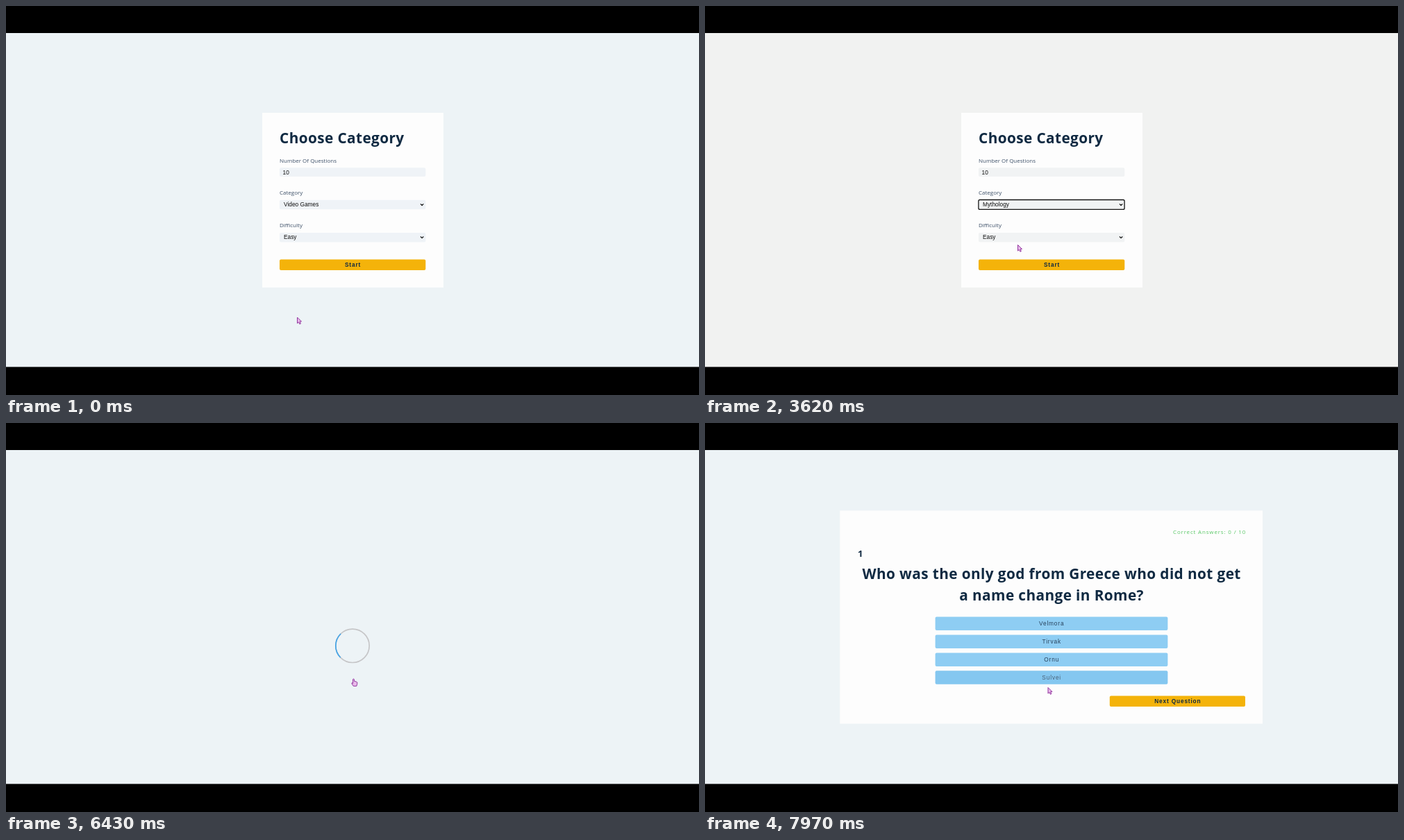
Write an HTML page with a canvas that moves like this. It is 998 px wide and 561 px high and loops after 8000 ms.

```html
<!DOCTYPE html>
<html lang="en">
<head>
<meta charset="utf-8">
<title>Quiz</title>
<style>
  html, body { margin: 0; width: 100%; height: 100%; overflow: hidden; background: #000; }
  canvas { display: block; width: 100vw; height: 100vh; }
</style>
</head>
<body>
<canvas id="stage" width="998" height="561"></canvas>
<script>
const ctx = document.getElementById('stage').getContext('2d');

const LOOP = 8000;
const FOCUS = 2650, PICK = 3250, LOAD = 4780, QUIZ = 6850, LEAVE = 7720;
const SPIN = 600, FADE = 300;

const SANS = '"Open Sans", "Noto Sans", sans-serif';
const ARIAL = '"Liberation Sans", Arial, sans-serif';
const INK = '#102a42', LABEL = '#3d5068', AMBER = '#f4b30a', CARD = '#fdfdfd';
const SKY = [142, 205, 243], DEEP = [79, 169, 224];
const DARK = [40, 66, 92], WHITE = [255, 255, 255];

const ANSWERS = ['Velmora', 'Tirvak', 'Ornu', 'Sulvei'];

// time, x, y of the pointer tip
const PATH = [
  [0, 419.5, 449], [150, 419.5, 449], [900, 445, 385], [1700, 468, 318],
  [2050, 472.5, 285], [2700, 472.5, 285], [3200, 452, 316], [3580, 450.5, 344.5],
  [3740, 450.5, 344.5], [4400, 500.5, 369], [7590, 500.5, 369],
  [7860, 494, 381.5], [8000, 494, 381.5]
];

const ARROW = [[0, 0], [0, 8.6], [2, 6.9], [3.4, 9.8], [4.9, 9.1], [3.6, 6.2], [6, 6]];
const HAND = [
  [-.9, .6], [0, 0], [.9, .6], [1, 3.4], [3.8, 4], [5.3, 5], [5.2, 7.6],
  [4.3, 10.4], [-.2, 10.4], [-2.6, 6.8], [-2.4, 5.7], [-.9, 6.6]
];

function box(x, y, w, h, r, fill) {
  ctx.beginPath();
  ctx.roundRect(x, y, w, h, r);
  ctx.fillStyle = fill;
  ctx.fill();
}

function text(str, x, y, font, color, spacing = 0, align = 'left') {
  ctx.font = font;
  ctx.letterSpacing = spacing + 'px';
  ctx.textAlign = align;
  ctx.fillStyle = color;
  ctx.fillText(str, x, y);
}

function mix(a, b, k) {
  return `rgb(${a.map((v, i) => Math.round(v + (b[i] - v) * k)).join(',')})`;
}

function pointerAt(t) {
  const i = PATH.findIndex(p => p[0] > t);
  const [t0, x0, y0] = PATH[i - 1], [t1, x1, y1] = PATH[i];
  const u = (t - t0) / (t1 - t0), k = u * u * (3 - 2 * u);
  return { x: x0 + (x1 - x0) * k, y: y0 + (y1 - y0) * k };
}

function drawField(y, h, value, fill, isSelect) {
  box(394, y, 210.3, h, 2, fill);
  text(value, isSelect ? 400 : 398.5, y + 9.4, `8.33px ${ARIAL}`, '#111');
  if (!isSelect) return;
  ctx.beginPath();
  ctx.moveTo(596.9, y + 5.5);
  ctx.lineTo(599.1, y + 7.7);
  ctx.lineTo(601.3, y + 5.5);
  ctx.strokeStyle = '#111';
  ctx.lineWidth = 1.2;
  ctx.stroke();
}

function drawButton(x, y, w, label) {
  box(x, y, w, 15.6, 2, AMBER);
  text(label, x + w / 2 + .4, y + 10.5, `bold 8.33px ${ARIAL}`, INK, .83, 'center');
}

function drawForm(t, fieldFill) {
  box(369, 154, 261, 252, 0, CARD);
  text('Choose Category', 394, 197.5, `bold 20.8px ${SANS}`, INK, .39);
  const label = `500 8px ${SANS}`;
  text('Number Of Questions', 394, 225.7, label, LABEL);
  text('Category', 394, 272.4, label, LABEL);
  text('Difficulty', 394, 319.4, label, LABEL);
  drawField(233.2, 12.8, '10', fieldFill, false);
  drawField(279.8, 13.4, t < PICK ? 'Video Games' : 'Mythology', fieldFill, true);
  drawField(327, 13.4, 'Easy', fieldFill, true);
  if (t >= FOCUS) {
    ctx.beginPath();
    ctx.roundRect(393.9, 279.5, 210.2, 13.9, 2);
    ctx.strokeStyle = '#141414';
    ctx.lineWidth = 1.3;
    ctx.stroke();
  }
  drawButton(394, 365.4, 210.3, 'Start');
}

function drawSpinner(t) {
  const turn = (t - LOAD) / SPIN * Math.PI * 2;
  const arc = (from, to, color) => {
    ctx.beginPath();
    ctx.arc(499, 321.3, 24.2, from, to);
    ctx.strokeStyle = color;
    ctx.lineWidth = 1.7;
    ctx.stroke();
  };
  arc(0, Math.PI * 2, '#c6c6c8');
  arc(turn - Math.PI * .75, turn - Math.PI * .25, '#45a5e8');
}

function drawQuiz(t) {
  box(194.3, 126.3, 608.7, 307.4, 0, CARD);
  text('Correct Answers: 0 / 10', 674, 160.2, `8px ${SANS}`, '#5ac867', .83);
  text('1', 219.9, 192.6, `bold 13px ${SANS}`, INK);
  const title = `bold 20.8px ${SANS}`;
  text('Who was the only god from Greece who did not get', 499.1, 224.5, title, INK, .39, 'center');
  text('a name change in Rome?', 499.1, 255.8, title, INK, .39, 'center');
  const hover = 1 - Math.min(1, Math.max(0, (t - LEAVE) / FADE));
  ANSWERS.forEach((name, i) => {
    const y = 279.6 + i * 25.9, k = i === 3 ? hover : 0;
    box(331.6, y, 334.8, 19.5, 2, mix(SKY, DEEP, k));
    text(name, 499.2, y + 12.5, `8.33px ${ARIAL}`, mix(DARK, WHITE, k), .83, 'center');
  });
  drawButton(582.8, 393.4, 195.2, 'Next Question');
}

function drawPointer({ x, y }, points) {
  ctx.beginPath();
  points.forEach(([dx, dy]) => ctx.lineTo(x + dx, y + dy));
  ctx.closePath();
  ctx.fillStyle = '#e9b9ea';
  ctx.fill();
  ctx.strokeStyle = '#93379f';
  ctx.lineWidth = 1;
  ctx.lineJoin = 'round';
  ctx.stroke();
}

function draw(t) {
  const pale = (t >= 3420 && t < 4200) || (t >= QUIZ && t < 7530);
  ctx.fillStyle = '#000';
  ctx.fillRect(0, 0, 998, 561);
  ctx.fillStyle = pale ? '#f1f2f1' : '#edf3f6';
  ctx.fillRect(0, 39, 998, 481.5);

  if (t < LOAD) drawForm(t, pale ? '#f1f3f4' : '#eff3f7');
  else if (t < QUIZ) drawSpinner(t);
  else drawQuiz(t);

  if (t >= QUIZ && t < 7530) return;
  const tip = pointerAt(t);
  const overStart = t < LOAD && tip.x > 394 && tip.x < 604 && tip.y > 365 && tip.y < 381;
  const hand = overStart || (t >= LOAD && t < LEAVE);
  drawPointer(tip, hand ? HAND : ARROW);
}

const start = performance.now();
function tick() {
  draw((performance.now() - start) % LOOP);
  requestAnimationFrame(tick);
}
tick();
</script>
</body>
</html>
```
